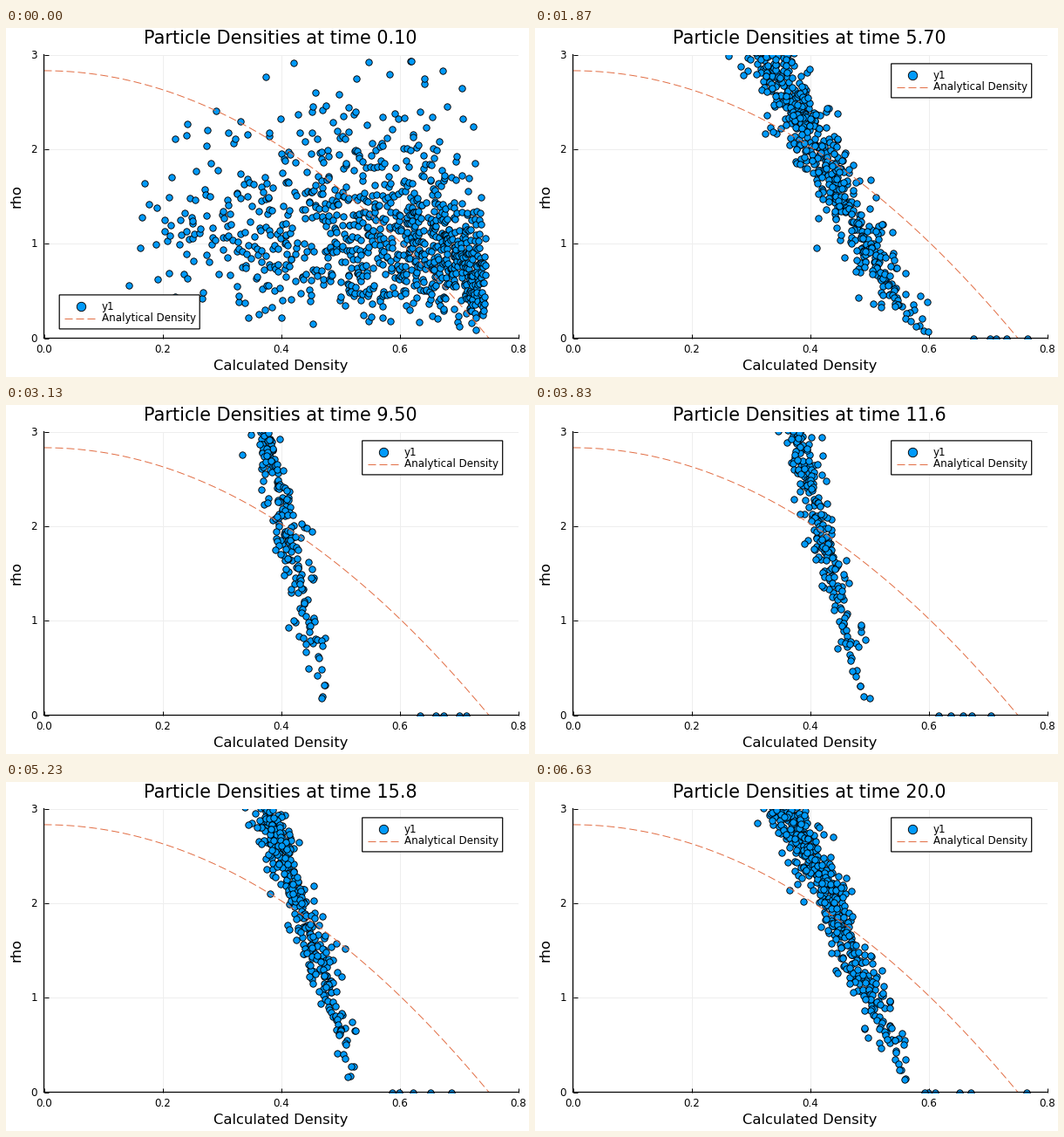
Recreate the animation shown at these times as a matplotlib script. Size 600 by 400 pixels, loop 6660 ms.

```python
import numpy as np
import matplotlib.pyplot as plt
from matplotlib.animation import FuncAnimation
from matplotlib.patches import Rectangle
from matplotlib.transforms import Affine2D

W, H, DPI = 600, 400, 100
FRAMES, LOOP = 200, 6660
LEFT, RIGHT, TOP, BOTTOM = 43.5, 588, 30.5, 355.5
BLUE, ORANGE = "#009AFA", "#E26F46"
PX = 72 / DPI  # points per pixel
EDGE = 1.2 * PX
N, STRAY = 1000, 6

plt.rcParams["font.family"] = "DejaVu Sans"

rng = np.random.default_rng(11)
u = np.sort(rng.uniform(0.005, 1, N))
r_start = 0.752 * np.cbrt(u)
rho_start = rng.gamma(4.6, 1 / 4.6, N) * 1.22 * (1 - 0.55 * (r_start / 0.752) ** 11)

# radius of each particle inside a parabolic density profile
grid = np.linspace(0, 1, 400)
x = np.interp((u - 0.005) / 0.995, 2.5 * grid**3 - 1.5 * grid**5, grid)

wobble = rng.normal(0, 1.35, N)
jitter = rng.normal(1, 0.05, N)
freq = rng.uniform(0.8, 2.4, N)
phase = rng.uniform(0, 2 * np.pi, N)
loose = rng.choice(np.arange(N // 2, N), STRAY, replace=False)
far = rng.uniform(0.66, 0.88, STRAY)
near = rng.uniform(0.58, 0.66, STRAY)


def smoothstep(v):
    v = np.clip(v, 0, 1)
    return v * v * (3 - 2 * v)


def star_radius(t):
    """Damped breathing with sharp minima and broad maxima."""
    a = 2 * np.pi * ((t - 1.1) / 2.07 + 0.0002 * t * t)
    return 0.56 + 0.135 * np.exp(-0.03 * t) * (0.3 * np.sin(a) ** 2 - np.cos(a))


def particles(t):
    size = star_radius(t)
    young = np.exp(-t / 4)
    core = 0.9 * (1 + 0.3 * young) / size**3
    tail = np.exp(-t / 5) * (0.2 * x**12 - 0.08 * x)
    spread = (0.026 + 0.05 * young) * size / 0.56
    r = size * (x + tail + spread * wobble * np.sin(freq * t + phase))
    rho = core * jitter * (1 - x**2) ** (1 + 0.8 * young)

    # loose particles orbiting outside the star
    a = 1.42 * t + phase[loose]
    r[loose] = np.hypot(far * np.cos(a), near * np.sin(a))
    rho[loose] = np.maximum(0, core * (1 - (r[loose] / size) ** 2))

    # free fall from the uniform sphere into the breathing star
    fall = max(np.cos(1.42 * t), 0.5)
    k = smoothstep((t - 0.2) / 1.1)
    r = (1 - k) * r_start * fall + k * np.abs(r)
    rho = (1 - k) * rho_start / fall**3 + k * rho
    return r, rho


fig = plt.figure(figsize=(W / DPI, H / DPI), dpi=DPI, facecolor="white")

ax = fig.add_axes([LEFT / W, 1 - BOTTOM / H, (RIGHT - LEFT) / W, (BOTTOM - TOP) / H])
ax.set(xlim=(0, 0.8), ylim=(0, 3))
ax.set_xticks(np.arange(5) * 0.2)
ax.set_yticks(range(4))
ax.tick_params(direction="in", length=5 * PX, width=PX,
               labelbottom=False, labelleft=False)
ax.grid(color="#EEEEEE", lw=PX)
ax.set_axisbelow(True)
for side in ("top", "right"):
    ax.spines[side].set_visible(False)
for side in ("left", "bottom"):
    ax.spines[side].set(linewidth=EDGE, snap=False)

DOT = dict(ls="", marker="o", mfc=BLUE, mec="black", mew=0.9 * PX, snap=False)
DASH = dict(color=ORANGE, lw=PX, ls=(0, (9, 4)), dash_capstyle="butt")

dots, = ax.plot([], [], ms=7.4 * PX, zorder=2, **DOT)
curve = np.linspace(0, 0.75, 200)
ax.plot(curve, 2.83 * (1 - (curve / 0.75) ** 2), zorder=2.2, **DASH)

# overlay in pixel coordinates, y pointing down
page = fig.add_axes([0, 0, 1, 1], zorder=5)
page.set(xlim=(0, W), ylim=(H, 0))
page.axis("off")


def label(px, py, text, size, ha="center", **kw):
    return page.text(px, py, text, fontsize=size * PX, ha=ha, va="baseline", **kw)


mid = (LEFT + RIGHT) / 2
title = label(mid - 0.5, 18, "", 20.8)
label(mid, 392, "Calculated Density", 16.35)
label(17, (TOP + BOTTOM) / 2 - 1, "rho", 16.35, rotation=90,
      rotation_mode="anchor")
for i in range(5):
    label(LEFT + i * (RIGHT - LEFT) / 4, 371.5, f"{i * 0.2:.1f}", 11.9)
for i in range(4):
    label(36, BOTTOM - i * (BOTTOM - TOP) / 3 + 4.3, str(i), 11.9, ha="right")

# legend, moved as one group
shift = Affine2D()
place = shift + page.transData
page.add_patch(Rectangle((408.7, 40.9), 161, 39, fc="white", ec="black", lw=EDGE,
                         snap=False, transform=place))
page.plot([433], [54.3], ms=10.4 * PX, transform=place, **DOT)
page.plot([414.5, 450.5], [67.5, 67.5], transform=place, **DASH)
label(457, 58.2, "y1", 11.9, ha="left", transform=place)
label(457, 71.4, "Analytical Density", 11.9, ha="left", transform=place)


def draw(frame):
    t = (frame + 1) / 10
    dots.set_data(*particles(t))
    clock = f"{t:.2f}" if t < 10 else f"{t:.1f}"
    title.set_text(f"Particle Densities at time {clock}")
    shift.clear()
    if t < 0.6:
        shift.translate(-347.5, 265)
    return dots, title


anim = FuncAnimation(fig, draw, frames=FRAMES, interval=LOOP / FRAMES,
                     repeat=True, repeat_delay=0, blit=False)
plt.show()
```
